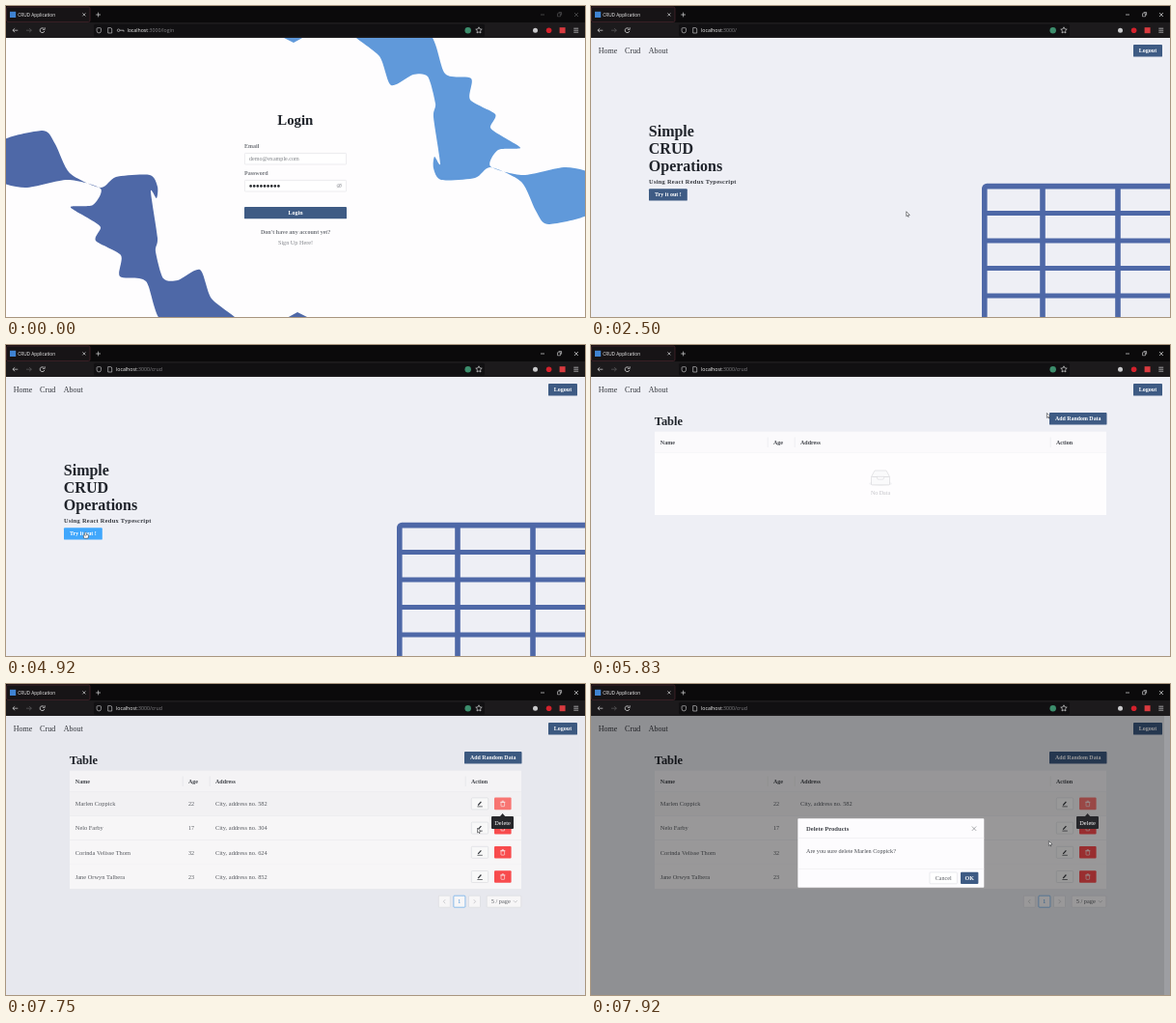
Recreate the animation shown at these times as an HTML page with a canvas. Size 600 by 322 pixels, loop 8 s.

```html
<!DOCTYPE html>
<html lang="en">
<head>
<meta charset="utf-8">
<title>CRUD Application</title>
<style>
html, body { margin: 0; width: 100%; height: 100%; overflow: hidden; background: #eeeff5; }
canvas { display: block; width: 100vw; height: 100vh; }
</style>
</head>
<body>
<canvas id="stage"></canvas>
<script>
const W = 600, H = 322, LOOP = 8000, TOP = 33;
const canvas = document.getElementById('stage');
const c = canvas.getContext('2d');
const ratio = Math.max(1, window.devicePixelRatio || 1);
canvas.width = W * ratio;
canvas.height = H * ratio;

const SERIF = '"Liberation Serif", "Noto Serif", serif';
const SANS = '"Open Sans", "Noto Sans", sans-serif';
const INDIGO = '#4e68a7', SKY = '#6099da', INK = '#20242b', GREY = '#5b5e64';
const PALE = '#d8d8da', EDGE = '#dcdde2', PAPER = '#fefdfe';
const NAVY = [62, 91, 132], HOVER = [64, 169, 255], RED = [255, 77, 79], ROSE = [255, 120, 117];

// Moments of the story, in ms
const AWAKE = 160, FOCUS = 1290, LOGIN_HOVER = 1590, HOME = 2170, TRY_HOVER = 4740, URL_CRUD = 4900;
const CRUD = 5000, ADD_HOVER = 5930, FIRST_ADD = 6170, ADD_GAP = 166;
const DEL_HOVER = 7240, TIP = 7290, MODAL = 7760;

const PEOPLE = [
  ['Marlen Coppick', 22, 582],
  ['Nelo Farby', 17, 304],
  ['Corinda Velisse Thom', 32, 624],
  ['Jane Orwyn Talbera', 23, 852]
];
// Pointer stops: arrival, travel time, x, y
const STOPS = [
  [830, 1, 480, 110], [1250, 420, 300, 187], [1600, 270, 333, 217], [4000, 1700, 187, 147],
  [4800, 550, 82, 195], [5800, 720, 473, 72], [6050, 200, 502, 77], [7150, 350, 519, 131],
  [7830, 230, 478, 158], [7920, 90, 475, 164]
];
// Key points of the ribbon outline
const RIBBON = [
  [-9, 142], [38, 129], [51, 143], [66, 173], [98, 188], [114, 177], [149, 175], [157, 187], [156, 199],
  [150, 192], [157, 240], [155, 254], [163, 282], [178, 284], [201, 273], [213, 303], [242, 330],
  [165, 330], [145, 285], [118, 280], [119, 258], [93, 243], [98, 229], [84, 219], [67, 208],
  [90, 206], [98, 189], [64, 180], [20, 188], [-9, 179]
];

const clamp = v => Math.max(0, Math.min(1, v));
const smooth = v => v * v * (3 - 2 * v);
const fade = (t, from, span) => smooth(clamp((t - from) / span));
const mix = (a, b, k) => `rgb(${a.map((v, i) => Math.round(v + (b[i] - v) * k))})`;

function paint(fill, stroke, lw = 0.6) {
  if (fill) { c.fillStyle = fill; c.fill(); }
  if (stroke) { c.strokeStyle = stroke; c.lineWidth = lw; c.stroke(); }
}

function box(x, y, w, h, fill, stroke, r = 0, lw) {
  c.beginPath();
  c.roundRect(x, y, w, h, r);
  paint(fill, stroke, lw);
}

function oval(x, y, rx, ry, fill, stroke, lw) {
  c.beginPath();
  c.ellipse(x, y, rx, ry, 0, 0, Math.PI * 2);
  paint(fill, stroke, lw);
}

function text(s, x, y, size, color, { bold = false, font = SERIF, align = 'left', gap = 0 } = {}) {
  c.font = `${bold ? 'bold ' : ''}${size}px ${font}`;
  c.letterSpacing = gap + 'px';
  c.textAlign = align;
  c.fillStyle = color;
  c.fillText(s, x, y);
}

function poly(points, color, lw = 0.7, fill) {
  c.beginPath();
  points.forEach(([x, y]) => c.lineTo(x, y));
  if (fill) c.closePath();
  paint(fill, color, lw);
}

const line = (x, y, dx, dy, color, lw) => poly([[x, y], [x + dx, y + dy]], color, lw);

function cross(x, y, r, color) {
  line(x - r, y - r, 2 * r, 2 * r, color);
  line(x - r, y + r, 2 * r, -2 * r, color);
}

// Tip at x, y; the arms reach back by dx, dy
function chevron(x, y, dx, dy, color) {
  const [sx, sy] = Math.abs(dx) < Math.abs(dy) ? [2, 0] : [0, 2];
  poly([[x - dx - sx, y - dy - sy], [x, y], [x - dx + sx, y - dy + sy]], color);
}

function button(label, x, y, w, h, fill, size = 6) {
  box(x, y, w, h, fill, null, 0.9);
  text(label, x + w / 2, y + h / 2 + 2, size, '#fff', { bold: true, align: 'center' });
}

function ribbon(color) {
  const n = RIBBON.length, at = i => RIBBON[(i + n) % n];
  c.beginPath();
  c.moveTo(...RIBBON[0]);
  for (let i = 0; i < n; i++) {
    const [p, q, r, s] = [at(i - 1), at(i), at(i + 1), at(i + 2)];
    c.bezierCurveTo(q[0] + (r[0] - p[0]) / 8, q[1] + (r[1] - p[1]) / 8,
      r[0] - (s[0] - q[0]) / 8, r[1] - (s[1] - q[1]) / 8, r[0], r[1]);
  }
  paint(color);
  poly([[291, 323], [302, 317], [314, 323]], null, 0, color);
}

function star(x, y, r) {
  const points = Array.from({ length: 11 }, (_, i) => {
    const a = (i * 0.2 - 0.5) * Math.PI, d = i % 2 ? r * 0.48 : r;
    return [x + d * Math.cos(a), y + d * Math.sin(a)];
  });
  poly(points, PALE);
}

function browser(t) {
  const login = t < HOME, y = 25.2;
  box(0, 0, W, 17, '#0b0a0b');
  box(0, 17, W, 16, '#1c1a1c');
  box(0.5, 1, 86.5, 15.5, '#171416', '#542a34', 1.5);
  box(4, 5.8, 6.2, 6.2, '#3f83d2');
  text('CRUD Application', 12.2, 10.8, 4.75, '#f2f2f2', { font: SANS });
  cross(80.9, 8.9, 1.5, PALE);
  line(93.2, 9, 4.8, 0, PALE);
  line(95.6, 6.6, 0, 4.8, PALE);
  const frame = t < AWAKE ? '#5a595b' : PALE;
  line(554, 9, 4, 0, frame);
  box(571.5, 7.8, 3, 3, null, frame);
  line(572.6, 6.6, 3, 0, frame);
  line(575.6, 6.6, 0, 3, frame);
  cross(591, 9, 2, frame);

  line(7, y, 5.3, 0, PALE);
  chevron(6.9, y, -2.3, 0, PALE);
  line(21, y, 5.3, 0, '#5d5c5f');
  chevron(26.4, y, 2.3, 0, '#5d5c5f');
  c.beginPath();
  c.arc(37.6, y, 2.4, 0.3, 5.4);
  paint(null, PALE, 0.8);
  poly([[40.2, 22.2], [40.2, 24.4], [38, 24.4]], PALE);

  box(91, 18.8, 405, 12.8, '#111012', null, 1.5);
  box(94.1, 22.7, 4.4, 5.2, null, PALE, [0.8, 0.8, 2.2, 2.2]);
  box(105.7, 22.6, 4, 5.4, null, PALE, [0, 1.5, 0, 0]);
  if (login) {
    oval(116.6, y, 1.3, 1.3, null, PALE);
    poly([[118, y], [122, y], [122, 26.6]], PALE);
  }
  const x = login ? 125.4 : 114, path = login ? 'login' : t >= URL_CRUD ? 'crud' : '';
  text('localhost', x, 27.3, 5.2, '#f4f4f4', { font: SANS });
  text(':3000/' + path, x + c.measureText('localhost').width, 27.3, 5.2, '#858488', { font: SANS });

  oval(478.7, y, 3.2, 3.2, '#3c8d6c');
  star(490, y, 3.4);
  oval(548.5, y, 2.5, 2.5, '#c9c9cb');
  oval(562.6, y, 2.8, 2.8, '#d4212c');
  box(573.6, 22.2, 6, 6, '#d83a3f');
  for (let i = -1; i < 2; i++) line(588.3, y + 2 * i, 4.9, 0, PALE);
}

function field(label, y, focused) {
  text(label, 247, y - 5, 6, '#75787e', { bold: true });
  box(247.4, y + 0.4, 105.2, 11.6, '#fff', focused ? '#8cc2f0' : '#e4e4e8', 0.8, focused ? 1 : 0.7);
}

function loginPage(t) {
  box(0, TOP, W, H - TOP, PAPER);
  ribbon(INDIGO);
  c.save();
  c.translate(W, H + TOP);
  c.rotate(Math.PI);
  ribbon(SKY);
  c.restore();

  text('Login', 299.8, 122.8, 14.8, INK, { bold: true, align: 'center' });
  field('Email', 152, false);
  text('demo@example.com', 252, 160, 6.1, '#7f8287');
  field('Password', 180, t >= FOCUS);
  for (let i = 0; i < 9; i++) oval(253.6 + i * 3.6, 186.4, 1.3, 1.3, '#25282c');
  oval(345.4, 186, 2.5, 1.6, null, '#a5a7ab');
  oval(345.4, 186, 0.7, 0.7, '#a5a7ab');
  line(343.3, 188.2, 4.3, -4.4, '#a5a7ab');
  button('Login', 247, 208, 106, 12.3, mix(NAVY, HOVER, fade(t, LOGIN_HOVER, 260)));
  text("Don't have any account yet?", 300.2, 236.3, 6, '#75787e', { bold: true, align: 'center' });
  text('Sign Up Here!', 300, 246.6, 6.2, '#85888d', { align: 'center' });
}

function navbar() {
  box(0, TOP, W, H - TOP, '#eeeff5');
  text('Home', 7.8, 48.5, 8, '#33363c');
  text('Crud', 35, 48.5, 8.2, '#33363c');
  text('About', 59.8, 48.5, 8, '#33363c');
  button('Logout', 562, 40, 30, 12.6, mix(NAVY, HOVER, 0));
}

function homePage(t) {
  navbar();
  ['Simple', 'CRUD', 'Operations'].forEach((s, i) => text(s, 59.8, 135 + i * 18.2, 16, INK, { bold: true }));
  text('Using React Redux Typescript', 60, 183.8, 6.4, '#373a40', { bold: true, gap: 0.28 });
  button('Try it out !', 60, 189.3, 39.8, 12.3, mix(NAVY, HOVER, fade(t, TRY_HOVER, 200)));

  box(407.8, 186.6, 230, 170, null, INDIGO, 2.5, 5.6);
  for (let i = 0; i < 4; i++) line(408, 214.5 + i * 28.5, 192, 0, INDIGO, 5);
  for (let i = 0; i < 2; i++) line(468 + i * 78, 186, 0, H, INDIGO, 5.6);
}

function emptyState() {
  const edge = '#d5d5d9';
  box(66, 111.6, 468, 64.4, PAPER);
  oval(300, 143.5, 12, 2.6, '#f3f3f5');
  poly([[290.5, 136.5], [294, 130], [306, 130], [309.5, 136.5]], edge, 0.6, '#fafafb');
  box(290.5, 136.5, 19, 8.3, '#fafafb', edge, 0.8);
  box(296.5, 136.3, 7, 2.8, PAPER, edge, [0, 0, 1.4, 1.4]);
  text('No Data', 300, 155.3, 6, '#c4c4c9', { align: 'center' });
}

function tableRow([name, age, no], i, t) {
  const y = 111.5 + i * 25.2, mid = y + 12.4, base = y + 14.6, first = i === 0;
  box(66, y, 468, 25.2, first && t > 7100 ? '#f9f8fa' : PAPER);
  box(66, y + 24.8, 468, 0.5, '#ededf1');
  text(name, 71.8, base, 6.4, GREY);
  text(age, 189, base, 6, GREY);
  text(`City, address no. ${no}`, 217, base, 6.4, GREY);

  box(482.3, mid - 6, 17.4, 12, '#fff', EDGE, 1);
  line(489.2, mid + 1.6, 3.2, -3.6, '#35383d', 1.2);
  line(488.4, mid + 3, 5.4, 0, '#35383d');
  box(506, mid - 6.3, 17.6, 12.6, mix(RED, ROSE, first ? fade(t, DEL_HOVER, 180) : 0), null, 1);
  line(512.2, mid - 1.6, 5.2, 0, '#fff');
  line(513.8, mid - 2.7, 2, 0, '#fff');
  box(513, mid - 1.6, 3.6, 4.4, null, '#fff', 0.5);
}

function pager(y) {
  const mid = y + 6;
  for (let i = 0; i < 3; i++) box(448.3 + i * 15.6, y, 12, 12, PAPER, i === 1 ? '#4a9fec' : EDGE, 0.8);
  box(498.2, y, 35.6, 12, PAPER, EDGE, 0.8);
  chevron(453.3, mid, -1.9, 0, '#bfc0c5');
  chevron(486.6, mid, 1.9, 0, '#bfc0c5');
  chevron(527.8, mid + 1, 0, 2.1, '#bfc0c5');
  text('1', 469.8, mid + 2, 6, '#3d8fdd', { align: 'center' });
  text('5 / page', 502.8, mid + 2, 6.3, GREY);
}

function crudPage(t) {
  navbar();
  text('Table', 65.8, 82.8, 12.4, INK, { bold: true });
  const lit = t < 7600 ? fade(t, ADD_HOVER, 180) : 0;
  button('Add Random Data', 475, 70, 59.5, 12.6, mix(NAVY, HOVER, lit), 5.9);

  box(66, 89.8, 468, 21.9, '#fbfafc');
  box(66, 111.3, 468, 0.5, '#ededf1');
  for (const [label, x] of [['Name', 71.8], ['Age', 189], ['Address', 217], ['Action', 482]]) {
    text(label, x, 102.6, 6, '#43464c', { bold: true });
    if (x > 100) box(x - 6.2, 95.5, 0.6, 10.5, '#e6e6ea');
  }

  const count = Math.max(0, Math.min(PEOPLE.length, Math.floor((t - FIRST_ADD) / ADD_GAP) + 1));
  if (!count) return emptyState();
  PEOPLE.slice(0, count).forEach((p, i) => tableRow(p, i, t));
  pager(118.4 + count * 25.2);
}

function tooltip(t) {
  c.globalAlpha = clamp((t - TIP) / 100);
  box(503, 137, 23, 13, '#26262a', null, 1);
  poly([[511.8, 137.2], [514.6, 134], [517.4, 137.2]], null, 0, '#26262a');
  text('Delete', 514.5, 145.7, 6.3, '#fff', { align: 'center' });
  c.globalAlpha = 1;
}

function modal(t) {
  const p = 1 - Math.pow(1 - clamp((t - MODAL) / 155), 4), s = 0.2 + 0.8 * p;
  c.save();
  c.globalAlpha = p;
  // Grows out of the delete button
  c.translate(528, 126);
  c.scale(s, s);
  c.translate(-528, -126);
  box(214.3, 139.2, 193, 71.6, '#fdfcfe', null, 0.8);
  for (const y of [159.4, 191.3]) box(214.3, y, 193, 0.5, '#e9e9ed');
  text('Delete Products', 223, 151.7, 6.6, '#43464c', { bold: true });
  cross(397, 149.7, 2.2, '#85878c');
  text(`Are you sure delete ${PEOPLE[0][0]}?`, 223, 175.3, 6.2, '#4a4d53');
  box(351, 195, 28.4, 11.8, '#fff', EDGE, 0.8);
  text('Cancel', 365.2, 203.2, 6.1, GREY, { align: 'center' });
  button('OK', 383, 194.8, 18.4, 12.2, mix(NAVY, HOVER, 0));
  c.restore();
}

function mask(t) {
  const k = fade(t, MODAL - 40, 190);
  box(0, TOP, 594, H - TOP, `rgba(0,0,0,${0.4 * k})`);
  box(594, TOP, 6, H - TOP, `rgba(0,0,0,${0.34 * k})`);
}

function cursor(t) {
  if (t < STOPS[0][0]) return;
  let x = 0, y = 0;
  for (const [arrive, span, sx, sy] of STOPS) {
    const k = fade(t, arrive - span, span);
    x += (sx - x) * k;
    y += (sy - y) * k;
  }
  const hand = [[LOGIN_HOVER, HOME], [TRY_HOVER, CRUD], [ADD_HOVER, 6860], [DEL_HOVER, 7630]]
    .some(([from, to]) => t > from && t < to);
  if (hand) {
    box(x - 1.6, y + 1.2, 5, 4, '#fff', '#34363a', 1.2);
    box(x - 0.4, y - 1.2, 1.5, 4, '#fff', '#34363a', 0.7, 0.4);
  } else {
    poly([[x - 0.6, y - 1.5], [x - 0.6, y + 3.4], [x + 0.5, y + 2.5], [x + 1.6, y + 4.2], [x + 1.4, y + 2.2], [x + 2.9, y + 2.1]],
      '#34363a', 0.6, '#fff');
  }
}

function draw(t) {
  c.setTransform(ratio, 0, 0, ratio, 0, 0);
  if (t < HOME) loginPage(t);
  else if (t < CRUD) homePage(t);
  else crudPage(t);
  mask(t);
  if (t > MODAL) modal(t);
  if (t > TIP) tooltip(t);
  browser(t);
  cursor(t);
}

const start = performance.now();
function tick() {
  draw((performance.now() - start) % LOOP);
  requestAnimationFrame(tick);
}
tick();
</script>
</body>
</html>
```
